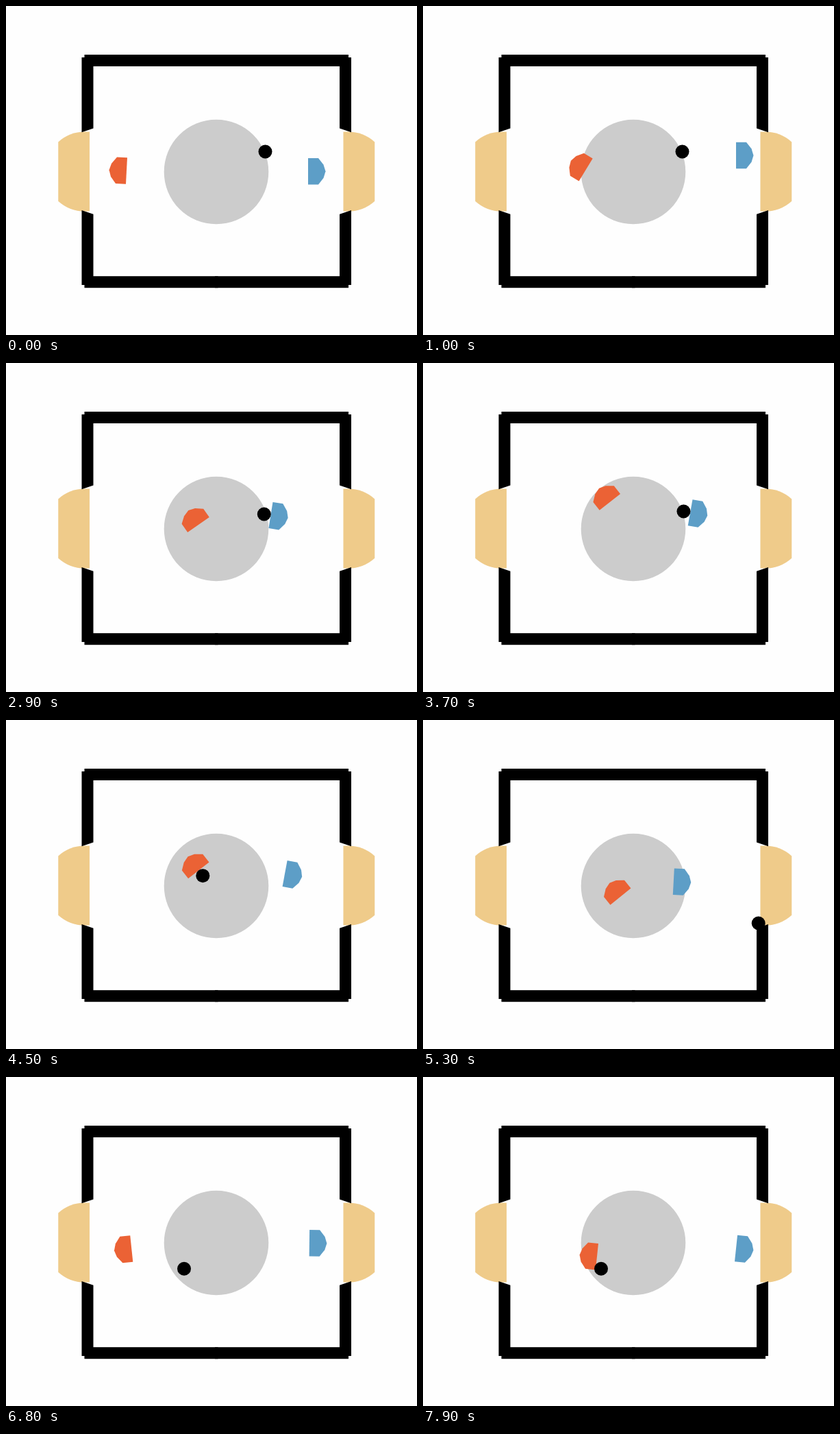
An HTML page with a canvas for the animation above (8 s loop, 600 by 480 pixels).

```html
<!DOCTYPE html>
<html lang="en">
<head>
<meta charset="utf-8">
<title>Air hockey</title>
<style>
html, body { margin: 0; width: 100%; height: 100%; overflow: hidden; background: #fefefe; }
canvas { display: block; }
</style>
</head>
<body>
<canvas id="stage" width="600" height="480"></canvas>
<script>
const ctx = document.getElementById('stage').getContext('2d');
const LOOP = 8000, STEP = 100;
const CATCH = 2800, PASS = 4200, RECEIVE = 4500, SHOT = 5300, RESET = 6500;
const WALL = { right: 477.5, bottom: 384 };
const BLUE_BACK = 404;

// Turning points: time, x, y, facing in degrees. One path per round.
const orange = [
  [[0, 171, 240.3, 3], [900, 228, 237, 28], [2000, 278.4, 230.5, 65], [2900, 278.1, 231.9, 55],
   [3600, 275, 202, 52], [4050, 247, 195, 52], [4500, 278.2, 215.5, 52], [5300, 285.3, 253.7, 51],
   [6400, 288, 285, 50]],
  [[6500, 171, 241, 0], [6800, 178.3, 251, -6], [7900, 249, 261.7, 6]]
];
const blue = [
  [[0, 446, 241.3, 180], [1000, 462, 218, 180], [2000, 427, 229, 180], [2500, 403, 237, 182],
   [2900, 391.4, 222.8, 189], [3600, 392, 219, 190], [4200, 418, 222, 190], [4500, 412, 225, 190.5],
   [5300, 370.8, 236, 183], [6400, 380, 250, 180]],
  [[6500, 446, 241.3, 180], [7900, 462, 250.5, 186]]
];

const rad = deg => deg * Math.PI / 180;
const mix = (a, b, u) => a + (b - a) * u;

// Cubic through the keys, starting from rest.
function follow(keys, t) {
  let i = 0;
  while (i < keys.length - 2 && t >= keys[i + 1][0]) i++;
  const a = keys[i], b = keys[i + 1], span = b[0] - a[0], u = (t - a[0]) / span;
  const slope = (k, c) => {
    const p = keys[k - 1], n = keys[k + 1];
    return p && n ? (n[c] - p[c]) / (n[0] - p[0]) : 0;
  };
  return [1, 2, 3].map(c =>
    mix(a[c], b[c], u * u * (3 - 2 * u)) +
    span * u * (1 - u) * (slope(i, c) * (1 - u) - slope(i + 1, c) * u));
}

function held([x, y, deg]) {
  return [x + 14.8 * Math.cos(rad(deg)), y + 14.8 * Math.sin(rad(deg))];
}

const below = (v, max) => v > max ? 2 * max - v : v;
const above = (v, min) => v < min ? 2 * min - v : v;

// Shot slowed by friction: off the bottom and right walls, then off blue's back.
function shot(t) {
  const travel = (1 - Math.exp(-0.8 * t)) / 0.8;
  const x = below(318.3 + 452 * travel, WALL.right);
  const y = below(296.5 + 353 * travel, WALL.bottom);
  return [above(x, BLUE_BACK), y];
}

function puckAt(t) {
  if (t < CATCH) return [378.5, 212.5];
  if (t < PASS) return held(follow(blue[0], t));
  if (t < RECEIVE) {
    const from = held(follow(blue[0], PASS)), to = held(follow(orange[0], RECEIVE));
    return from.map((v, i) => mix(v, to[i], (t - PASS) / (RECEIVE - PASS)));
  }
  if (t < SHOT) return held(follow(orange[0], t));
  if (t < RESET) return shot((t - SHOT) / 1000);
  return [260, 279.7];
}

function polygon(points, color) {
  ctx.fillStyle = color;
  ctx.beginPath();
  points.forEach(p => ctx.lineTo(...p));
  ctx.fill();
}

function disc(x, y, r, color) {
  ctx.fillStyle = color;
  ctx.beginPath();
  ctx.arc(x, y, r, 0, 2 * Math.PI);
  ctx.fill();
}

function racket([x, y, deg], color) {
  const half = [[5, 19.3], [-10, 19.3], [-17.5, 9.7], [-20.5, 0]];
  const mirrored = half.map(([px, py]) => [px, -py]).reverse();
  ctx.save();
  ctx.translate(x, y);
  ctx.rotate(rad(deg));
  polygon([...half, ...mirrored], color);
  ctx.restore();
}

function goal() {
  const cut = Math.acos(38.8 / 58);
  ctx.fillStyle = '#efcb8a';
  ctx.beginPath();
  ctx.moveTo(-185.2, -57.5);
  ctx.arc(-192.2, 0.5, 58, -Math.PI / 2, cut - Math.PI, true);
  ctx.arc(-192.2, 0.5, 58, Math.PI - cut, Math.PI / 2, true);
  ctx.lineTo(-185.2, 58.5);
  ctx.fill();
}

function wallCorner() {
  polygon([[-196.75, -166], [-179.75, -166], [-179.75, -62.6], [-196.75, -56.8]], '#000');
  ctx.fillRect(-192.75, -170.1, 195, 17);
}

function field() {
  ctx.fillStyle = '#fefefe';
  ctx.fillRect(0, 0, 600, 480);
  disc(307, 242, 76.3, '#ccc');
  for (const sx of [1, -1]) {
    ctx.setTransform(sx, 0, 0, 1, 307.25, 241.1);
    goal();
    wallCorner();
    ctx.scale(1, -1);
    wallCorner();
  }
  ctx.resetTransform();
}

function draw(now) {
  const t = Math.floor(now % LOOP / STEP) * STEP;
  const round = t < RESET ? 0 : 1;
  field();
  racket(follow(orange[round], t), '#eb6235');
  racket(follow(blue[round], t), '#5d9ec7');
  disc(...puckAt(t), 10, '#000');
}

const start = performance.now();
function tick() {
  draw(performance.now() - start);
  requestAnimationFrame(tick);
}
tick();
</script>
</body>
</html>
```
